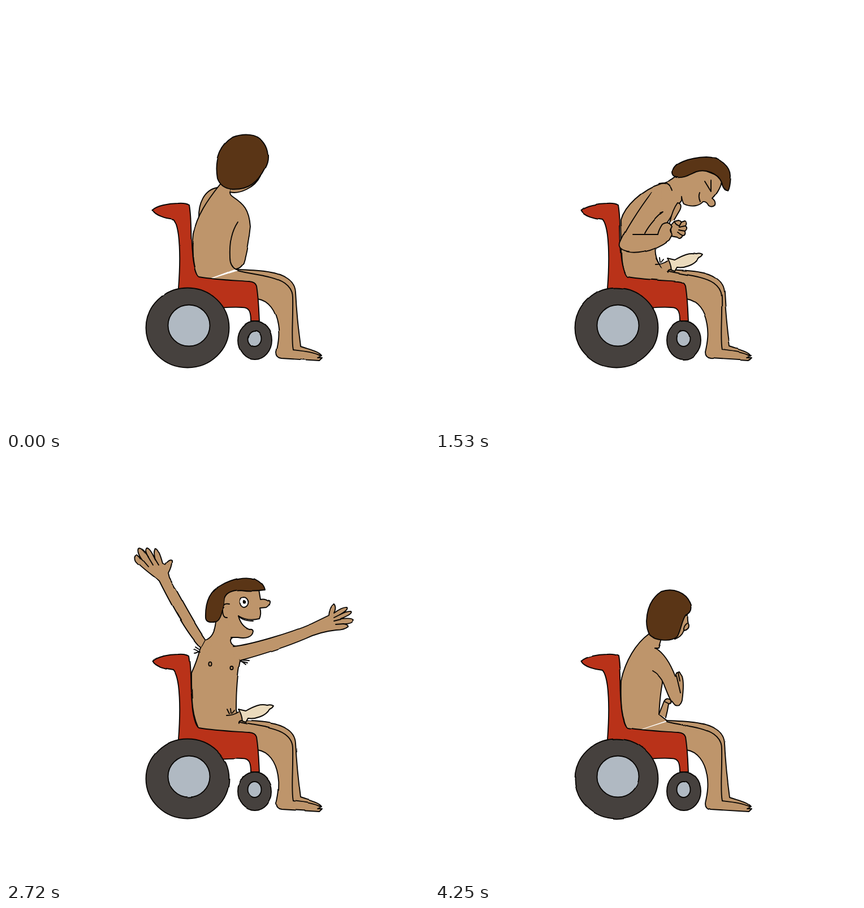
An HTML page without scripts for the animation above (4.42 s loop, 748 px wide and 748 px high).

```html
<!DOCTYPE html>
<html lang="en">
<head>
<meta charset="utf-8">
<title>Wheelchair cartoon</title>
<style>
  html, body { margin: 0; height: 100%; overflow: hidden; background: #fff; }
  svg { display: block; width: 100vw; height: 100vh; }

  .ink { stroke: #080604; stroke-width: 1.9; stroke-linejoin: round; stroke-linecap: round; fill: none; }
  .skin { fill: #be956b; }
  .hair { fill: #5a3516; }
  .chair { fill: #b93219; }
  .tyre { fill: #46413e; }
  .hub { fill: #b0b9c2; }
  .latex { fill: #ebdbbd; }
  .white { fill: #fff; }
  .lip { fill: #d6a08c; }
  .pupil { fill: #080604; stroke: none; }
  .patch { stroke: none; }

  .pose { visibility: hidden; animation: 4.42s step-end infinite; }
  .away { animation-name: away; }
  .fit { animation-name: fit; }
  .glee { animation-name: glee; }
  .open { animation-name: open; }
  .cheer { animation-name: cheer; }
  .shock { animation-name: shock; }
  .turn { animation-name: turn; }
  .worn { animation-name: worn; }
  .bare { animation-name: bare; }
  @keyframes away { 0% { visibility: visible } 15.384% { visibility: hidden } }
  @keyframes fit { 15.384% { visibility: visible } 30.769% { visibility: hidden } }
  @keyframes glee { 30.769% { visibility: visible } 42.307% { visibility: hidden } }
  @keyframes open { 42.307% { visibility: visible } 96.153% { visibility: hidden } }
  @keyframes cheer { 42.307% { visibility: visible } 84.615% { visibility: hidden } }
  @keyframes shock { 84.615% { visibility: visible } 96.153% { visibility: hidden } }
  @keyframes turn { 96.153% { visibility: visible } }
  @keyframes worn { 30.769% { visibility: visible } 84.615% { visibility: hidden } }
  @keyframes bare {
    15.384% { visibility: visible } 30.769% { visibility: hidden }
    84.615% { visibility: visible } 96.153% { visibility: hidden }
  }

  .arm { animation: 4.42s step-end infinite; }
  .back { transform-origin: 346px 332px; animation-name: back; }
  .front { transform-origin: 407px 346px; animation-name: front; }
  .drop { animation: drop 4.42s step-end infinite; }
  @keyframes back { 42.307% { transform: rotate(-13deg) } 46.153% { transform: none } }
  @keyframes front { 42.307% { transform: rotate(6deg) } 46.153% { transform: none } }
  @keyframes drop {
    84.615% { transform: translate(-2px, -10px) }
    88.461% { transform: none }
    92.307% { transform: translate(2px, 8px) }
  }
</style>
</head>
<body>
<svg viewBox="0 0 748 748">
  <!-- hand-drawn line boil -->
  <filter id="boil" x="0" y="0" width="748" height="748" filterUnits="userSpaceOnUse" color-interpolation-filters="sRGB">
    <feTurbulence type="fractalNoise" baseFrequency=".02" numOctaves="1" seed="1" result="noise">
      <animate attributeName="seed" values="1;2;3;4;5;6;7;8;9;10;11;12;13" calcMode="discrete" dur="2.21s" repeatCount="indefinite"/>
    </feTurbulence>
    <feDisplacementMap in="SourceGraphic" in2="noise" scale="3" xChannelSelector="R" yChannelSelector="G"/>
  </filter>

  <g class="ink" filter="url(#boil)">
    <!-- legs -->
    <path class="skin" d="M408 466C445 467 479 469 495 480Q511 489 512 506C514 545 518 580 521 602C535 607 552 610 558 618L505 612 500 515 485 490"/>
    <path class="skin" d="M410 468C435 475 475 477 493 490Q507 500 507 515C508 550 504 590 508 608C525 610 545 612 557 619L551 622 559 622 554 627 488 623Q478 622 478 612C482 594 484 580 481 563C477 538 464 521 445 518L400 500 340 490"/>

    <!-- torsos -->
    <g class="pose away">
      <path class="skin" d="M341 375C340 350 350 325 374 321"/>
      <path class="skin" d="M345 488C329 470 328 430 331 403C338 370 355 345 378 316L400 300 397 327Q394 333 402 338C420 350 430 360 432 390C430 410 425 440 420 455Q415 464 407 465"/>
      <path d="M410 382C398 400 395 425 396 445Q396 460 407 466"/>
    </g>
    <g class="pose fit">
      <path class="skin" d="M345 488C328 465 330 410 335 395C340 375 352 355 356 340C360 325 372 318 378 304L385 275 410 290 402 325Q393 325 397 333C408 345 409 365 408 380C402 400 395 420 395 450L411 469"/>
      <ellipse cx="395" cy="377" rx="2.2" ry="4"/>
    </g>
    <g class="pose glee">
      <path class="skin" d="M345 488C329 470 330 440 330 420L329 378C335 355 365 325 400 314Q415 312 425 303L450 310 436 340Q438 345 428 352C420 375 395 400 390 420C388 440 392 450 400 462L412 470"/>
    </g>
    <g class="pose open">
      <path class="skin" d="M345 488C328 460 328 430 328 382Q338 360 343 340L352 323Q369 318 371 290L384 245 405 250 408 318Q397 318 397 325Q398 333 407 335L414 360C408 390 407 420 407 447L412 470"/>
      <g class="arm back">
        <path class="skin" d="M344 337C318 310 290 257 271 219C258 208 240 196 230 184Q226 176 232 173L241 181Q232 168 235 162Q240 158 252 177Q244 165 249 161Q255 161 264 182Q260 166 264 161Q270 162 277 188L281 190Q288 180 293 183Q294 192 287 205L289 213C309 250 335 298 352 322"/>
        <path d="M241 181l11 13M251 176l9 15M264 181l6 10"/>
      </g>
      <g class="arm front">
        <path class="skin" d="M402 335C432 332 500 312 540 295L571 280Q573 262 580 260Q585 265 580 276Q595 265 603 266Q606 270 590 279Q603 272 610 273Q614 277 592 286Q612 284 615 288Q612 296 596 295Q605 296 605 300Q598 306 584 306Q555 309 530 321C490 338 450 350 414 360"/>
        <path d="M590 279l-10 5M592 287l-12 3M597 295l-14 1"/>
      </g>
      <path class="skin patch" d="M345 338L353 323 365 330 352 350ZM400 337L412 336 419 357 405 358Z"/>
      <path d="M343 345l-10-5M342 344l-8 3M341 340l-6-4M414 361l13 3M415 360l9 7M417 359l13 1"/>
      <ellipse cx="361" cy="366" rx="2.6" ry="3.6"/>
      <ellipse cx="400" cy="373" rx="2.6" ry="3"/>
    </g>
    <g class="pose turn">
      <path class="skin" d="M345 488C328 465 328 430 329 395C337 360 355 330 378 313L385 300 405 300 400 325Q398 332 396 338L390 338C400 343 402 360 402 400C398 420 397 440 396 455L410 466"/>
      <path class="skin" d="M396 455Q402 440 405 432Q410 424 417 430Q418 435 413 437Q411 450 408 461M405 432l8 4"/>
      <path class="skin" d="M385 379Q398 386 404 400C412 420 416 432 424 439Q434 442 437 430Q441 400 437 388L432 380 427 382 425 388C415 362 402 345 390 338"/>
      <path d="M427 387l7 30M430 382l3 14"/>
    </g>

    <!-- lap -->
    <g class="pose bare">
      <path class="skin" d="M392 457C408 455 427 447 438 439Q438 432 445 430L454 429Q458 437 450 443L444 444C440 455 430 464 411 471"/>
      <path d="M438 439q3-2 7 4M394 454l-6-8M397 453v-8M399 453l4-6"/>
    </g>
    <g class="pose worn">
      <path class="skin patch" d="M398 457L413 449 419 466 405 471Z"/>
      <path d="M390 457Q402 457 411 451M418 466Q411 466 412 471M395 454l-4-8M398 453l-1-8M400 453l4-5"/>
      <path class="latex" d="M411 446L424 449C440 440 450 436 462 439Q468 437 473 440Q471 444 466 446C460 458 440 464 428 462L424 469 418 467Q417 455 411 446Z"/>
    </g>
    <g class="pose shock"><g class="drop">
      <path class="latex" d="M459 447Q466 447 466 455L470 459 475 461 474 464 467 464 460 466Q455 456 459 447Z"/>
      <path d="M459 447q4 9 1 19"/>
    </g></g>

    <!-- wheelchair -->
    <path class="chair" d="M258.500 361C267 353 288 349 304 349Q317 348 324 352C329 380 326 410 329 435C330 455 335 476 341 479C370 484 400 485 430 487Q441 488 443 495C447 520 447 540 448 557L433 557C433 540 430 533 418 533C405 532 390 533 378 534L305 499C308 460 308 430 305 405Q302 383 296 377C284 376 263 371 258.500 361Z"/>
    <ellipse class="tyre" cx="321" cy="569" rx="73.500" ry="70.500"/>
    <ellipse class="hub" cx="323.500" cy="565" rx="37" ry="36.500"/>
    <ellipse class="tyre" cx="440" cy="591" rx="30" ry="34"/>
    <ellipse class="hub" cx="439.500" cy="588" rx="12" ry="14"/>

    <!-- heads and near arms -->
    <g class="pose away">
      <path class="skin" d="M396 329C412 333 440 322 450 300L400 315"/>
      <path class="hair" d="M401 232C422 224 444 227 452 238C465 252 466 272 458 286C445 312 430 325 400 324Q380 322 374 305C368 270 380 245 401 232Z"/>
    </g>

    <g class="pose fit">
      <path class="latex" d="M457 416q5-5 10-2q7-2 9 6l1 8-18-4Z"/>
      <path class="skin" d="M354 347C353 375 362 405 380 424C400 435 425 440 442 444Q455 447 470 440L477 432Q478 424 473 420L465 423 455 419 447 424C425 418 405 410 389 402C380 390 376 375 377 360"/>
      <path d="M476 427l-12 5M473 436l-10 1M455 419l6 6"/>
      <path class="skin" d="M396 325C415 334 432 328 440 318Q448 308 450 304C458 309 467 308 467 303Q463 292 457 288C460 278 461 268 461 258L440 245 412 250 400 270"/>
      <path class="hair" d="M371 300C367 260 382 238 405 227C430 215 460 220 470 240Q476 250 475 257Q470 264 462 261C445 255 425 252 416 255C407 260 405 270 404 280C400 290 390 303 376 304Q371 304 371 300Z"/>
      <path d="M412 269Q404 265 404 275L402 288M426 304C425 318 433 323 435 319"/>
      <ellipse class="white" cx="440" cy="279" rx="8.500" ry="10.500"/>
      <circle class="pupil" cx="442" cy="285" r="3.300"/>
    </g>

    <g class="pose glee">
      <path class="skin" d="M415 383Q420 360 429 348Q438 350 433 361L423 378"/>
      <path class="skin" d="M417 388L423 381 431 379 435 382 441 380Q447 383 443 389Q448 393 442 398Q444 406 438 406Q434 414 428 409L417 407Z"/>
      <path d="M431 391l11-2M430 396l12 2M428 400l10 6M423 381q4 7 8 8l4-7"/>
      <path class="skin" d="M383 330C360 360 335 400 327 420Q325 428 333 432C350 440 385 435 413 414L418 405 416 396 419 390Q413 379 402 386Q396 395 394 404L350 404"/>
      <path class="skin patch" d="M383 330L400 320 402 364 372 401 350 403 345 395Z"/>
      <path d="M351 404L394 404M371 402C380 385 395 370 403 364l-5 2"/>
      <path d="M396 314Q414 310 419 326"/>
      <path class="skin" d="M436 337Q437 345 440 350C455 357 468 353 474 346Q480 345 484 353Q490 357 495 352C497 345 493 342 490 340C500 330 508 315 508 303L470 288 428 300"/>
      <path class="hair" d="M420 295C420 278 450 268 480 267C505 267 522 285 522 300Q521 322 517 327Q510 324 507 312C500 295 478 288 462 293C450 298 440 305 428 303Q420 302 420 295Z"/>
      <path d="M477 309L488 327 488 308M468 329Q465 337 469 346"/>
    </g>

    <g class="pose cheer">
      <path class="skin" d="M398 319L410 319C425 322 436 318 437 308Q436 304 431 305Q416 300 411 281C425 290 440 288 448 286Q452 277 449 267L460 266Q467 262 466 256Q458 250 450 252L446 228 400 228 384 245"/>
      <path class="hair" d="M353 285C352 260 358 238 380 227C400 215 425 210 440 216Q455 223 457 235Q435 238 415 235Q390 236 386 250C384 270 380 288 372 291Q355 295 353 285Z"/>
      <path d="M395 260Q383 257 383 270Q383 285 391 284M411 281Q418 290 437 290"/>
      <ellipse class="white" cx="421.500" cy="256.500" rx="8" ry="9.500"/>
      <ellipse class="pupil" cx="422.500" cy="256" rx="2.800" ry="3.500"/>
    </g>

    <g class="pose shock">
      <path class="skin" d="M394 323Q397 330 410 328C425 325 430 312 433 301Q447 302 447 294C443 288 436 282 442 258L430 240 400 240 388 260"/>
      <path class="hair" d="M356 285C357 260 375 240 395 230C415 221 440 228 450 240Q458 250 457 260Q450 264 443 257C430 246 405 246 393 256C385 268 380 285 370 291Q356 294 356 285Z"/>
      <path d="M393 270Q383 266 379 277Q377 288 383 296"/>
      <ellipse class="white" cx="420" cy="270" rx="8" ry="9.500"/>
      <circle class="pupil" cx="420.500" cy="274.500" r="3.200"/>
      <ellipse class="lip" cx="414.500" cy="312" rx="5" ry="6.500" transform="rotate(15 414.500 312)"/>
    </g>

    <g class="pose turn">
      <path class="skin" d="M424 322Q436 318 440 307Q450 305 449 297Q446 292 447 278L428 290Z"/>
      <path d="M440 307q-1-8 6-13"/>
      <path class="hair" d="M400 238C420 231 445 238 453 262Q456 275 443 280C436 290 434 310 428 318C415 328 390 324 380 315Q374 305 374 290C375 265 385 248 400 238Z"/>
    </g>
  </g>
</svg>
</body>
</html>
```
